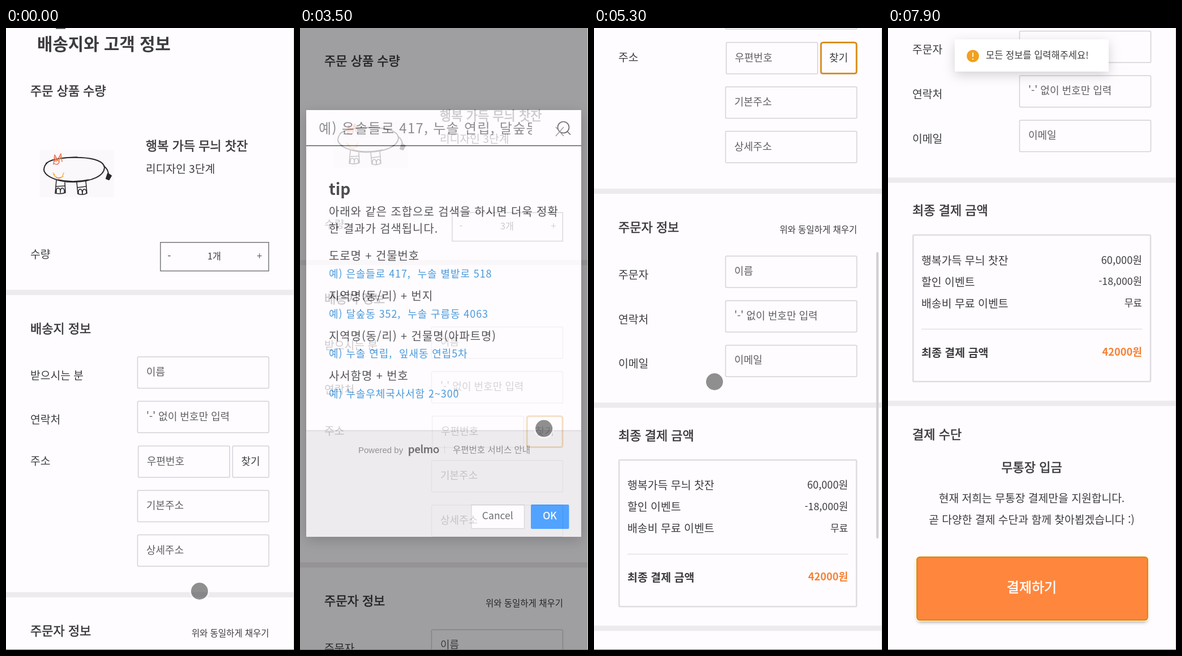
Recreate the animation shown at these times as an HTML page. Size 509 by 1099 pixels, loop 8000 ms.

```html
<!DOCTYPE html>
<html lang="ko">
<head>
<meta charset="utf-8">
<style>
html, body { margin: 0; width: 100%; height: 100%; overflow: hidden; background: #fefcff; }
svg { display: block; width: 100%; height: 100%; }
text { font-family: "Noto Sans CJK KR", "Noto Sans CJK", "Noto Sans", sans-serif; white-space: pre; fill: #3d3c3f; }
.m { stroke: #38373a; stroke-width: .55; fill: #38373a; }
.b { font-weight: 700; }
.ph { fill: #5f5e61; }
.k { fill: #1c1b1d; letter-spacing: .9px; }
.ex { fill: #0d79cf; letter-spacing: .9px; }
</style>
</head>
<body>
<svg id="stage" viewBox="0 0 509 1099" preserveAspectRatio="none"></svg>
<script>
const stage = document.getElementById('stage');
const ORANGE = '#d98a12';

// cy is the optical middle of the line
const text = (x, cy, size, str, cls = '', attr = '') =>
  `<text x="${x}" y="${cy + size * .37}" font-size="${size}" class="${cls}" ${attr}>${str}</text>`;
const mid = 'text-anchor="middle"', end = 'text-anchor="end"';
const rect = (x, y, w, h, attr) => `<rect x="${x}" y="${y}" width="${w}" height="${h}" ${attr}/>`;
const box = (x, y, w, h = 55.5) => rect(x, y, w, h, 'rx="2" fill="none" stroke="#d3d1d7" stroke-width="1.5"');
const bar = y => rect(0, y, 508, 9.3, 'fill="#edebee"');
const ring = (id, x, y, w, h) => rect(x, y, w, h, `id="${id}" rx="4" fill="#fefcff" stroke="${ORANGE}" stroke-width="2.8"`);
const label = (y, str) => text(43, y, 19.3, str);
const head = (y, str) => text(43, y, 22, str, 'm');
const field = (y, str) => box(232.5, y, 232) + text(248, y + 26.3, 18, str, 'ph');
const row = (y, name, price, size) => text(59, y, 19.4, name) + text(449, y - .7, size, price, '', end);

const animal = `
  ${rect(59, 216, 132, 83, 'fill="#faf8fb"')}
  <g fill="none" stroke="#29282a" stroke-width="2" stroke-linecap="round" stroke-linejoin="round">
    <path d="M71 239C82 230 110 228 133 229C156 230 174 236 174 247C173 261 153 271 121 272C94 273 69 263 67 251Q67 243 73 238"/>
    <path d="M80 234Q100 228 126 228M92 268Q118 274 146 268" stroke-width="1.4"/>
    <path d="M173 244Q181 250 181 259"/>
    <path d="M180 257l6 4-4 7-5-2z" fill="#29282a"/>
    <path d="M89 269L87 292Q96 294 105 291L104 273M88 280l16-1M89 291q-1-9 4-8 4 1 3 8 0-9 4-8 4 1 3 8" stroke-width="1.6"/>
    <path d="M125 272L127 293Q135 296 143 292L141 270M126 282l15-2M128 293q-1-9 4-8 3 1 3 8 0-9 4-8 4 1 3 7" stroke-width="1.6"/>
    <path d="M84 241L86 224L91 233L97 222L99 236M85 236Q92 231 94 237Q91 244 85 239" stroke="#ee7058" stroke-width="1.5"/>
    <path d="M87 229l2 7M96 227l-2 8" stroke="#f5a24c" stroke-width="2"/>
    <path d="M83 256l3 3M84 259Q92 269 101 262M100 261l2-5" stroke="#f3b64e" stroke-width="1.6"/>
    <path d="M88 264q5 3 9 0" stroke="#ee7058" stroke-width="1"/>
  </g>`;

const page = `
  ${rect(88, 0, 17, 1.6, 'fill="#4a494c"')}
  ${text(55, 28, 29.8, '배송지와 고객 정보', 'b')}
  ${head(110.5, '주문 상품 수량')}
  ${animal}
  ${text(247, 208, 22, '행복 가득 무늬 찻잔', 'm')}
  ${text(247, 248.5, 19.3, '리디자인 3단계')}
  ${label(399.5, '수량')}
  <rect id="stepper" y="378.8" height="50.5" fill="none" stroke="#77767a" stroke-width="1.5"/>
  <text id="minus" y="408.5" font-size="17" ${mid}>-</text>
  <text id="count" y="408.5" font-size="16.3" ${mid}></text>
  ${ring('plusRing', 432, 378.3, 33.3, 51.5)}
  ${text(448, 402.5, 17, '+', 'ph', mid)}
  ${bar(462.5)}
  ${head(530.5, '배송지 정보')}
  ${label(614, '받으시는 분')}${field(581, '이름')}
  ${label(692, '연락처')}${field(659.6, "'-' 없이 번호만 입력")}
  ${label(765, '주소')}
  ${box(233.7, 738.4, 161.6)}${text(249, 765, 18, '우편번호', 'ph')}
  ${box(400.5, 738.4, 64)}${ring('findRing', 401.2, 738.6, 62.8, 54.8)}
  ${text(432.3, 765, 18, '찾기', '', mid)}
  ${field(817, '기본주소')}${field(895.6, '상세주소')}
  ${bar(996.7)}
  ${head(1065, '주문자 정보')}
  ${text(465, 1069, 15.5, '위와 동일하게 채우기', '', end)}
  ${label(1148.5, '주문자')}${field(1116, '이름')}
  ${label(1227.5, '연락처')}${field(1194.8, "'-' 없이 번호만 입력")}
  ${label(1306, '이메일')}${field(1273.4, '이메일')}
  ${bar(1374.7)}
  ${head(1432.5, '최종 결제 금액')}
  ${rect(44.3, 1476.3, 419.7, 259, 'rx="2" fill="none" stroke="#dfdde2" stroke-width="2.6"')}
  ${row(1521, '행복가득 무늬 찻잔', '60,000원', 18.2)}
  ${row(1559, '할인 이벤트', '-18,000원', 17.8)}
  ${row(1597, '배송비 무료 이벤트', '무료', 17)}
  ${rect(59, 1641.8, 390, 1.5, 'fill="#e3e1e5"')}
  ${text(59, 1684, 19.5, '최종 결제 금액', 'b')}
  ${text(449, 1682.5, 18.2, '42000원', 'b', end + ' style="fill:#f58134"')}
  ${bar(1769)}
  ${head(1828, '결제 수단')}
  ${text(254, 1886.5, 22, '무통장 입금', 'm', mid)}
  ${text(254, 1941, 19.3, '현재 저희는 무통장 결제만을 지원합니다.', '', mid)}
  ${text(254, 1979, 19.3, '곧 다양한 결제 수단과 함께 찾아뵙겠습니다 :)', '', mid)}
  ${rect(52, 2046, 406, 110, 'rx="5" fill="#ff863d" filter="url(#lift)"')}
  <g id="payRing" fill="none">
    ${rect(49.6, 2043.8, 410.8, 114.4, 'rx="6" stroke="#fff" stroke-width="1.5"')}
    ${rect(51.3, 2045.5, 407.4, 111, `rx="5" stroke="${ORANGE}" stroke-width="2.4"`)}
  </g>
  ${text(254, 2099, 24, '결제하기', '', mid + ' style="fill:#fff;stroke:#fff;stroke-width:.6"')}`;

const tips = [
  ['도로명 + 건물번호', '예) 은솔들로 417,  누솔 별밭로 518'],
  ['지역명(동/리) + 번지', '예) 달숲동 352,  누솔 구름동 4063'],
  ['지역명(동/리) + 건물명(아파트명)', '예) 누솔 연립,  잎새동 연립5차'],
  ['사서함명 + 번호', '예) 누솔우체국사서함 2~300']
].map(([a, b], i) => text(51, 403 + i * 70.6, 20, a, 'k') + text(51, 434.5 + i * 70.5, 18, b, 'ex')).join('');

const modal = `
  ${rect(0, 0, 508, 1098, 'fill="#000" opacity=".5"')}
  ${rect(11, 145, 486, 754, 'fill="#fefcff" filter="url(#deep)"')}
  <g clip-path="url(#query)">${text(33, 177, 24, '예) 은솔들로 417, 누솔 연립, 달숲동', '', 'style="fill:#68676a;letter-spacing:1.3px"')}</g>
  <g fill="none" stroke="#3c3b3e" stroke-width="1.7">
    <circle cx="465.5" cy="175.5" r="10"/><path d="M472.5 183l5.5 5.5"/>
    <path d="M452 175l14 16M466 175l-14 16" stroke="#777" stroke-width="1.4"/>
  </g>
  ${rect(11, 207, 486, 1.8, 'fill="#4c4b4f"')}
  ${text(51, 285, 28, 'tip', 'b', 'style="fill:#111"')}
  ${text(51, 324.5, 20, '아래와 같은 조합으로 검색을 하시면 더욱 정확', 'k')}
  ${text(51, 354.5, 20, '한 결과가 검색됩니다.', 'k')}
  ${tips}
  ${rect(11, 711, 486, 188, 'fill="#e8e6e9"')}${rect(11, 710.5, 486, 2, 'fill="#d5d3d7"')}
  ${text(103, 745.5, 15, 'Powered by', '', 'style="fill:#6d6c6f;font-family:Liberation Sans,sans-serif"')}
  ${text(191, 744, 18.5, 'pelmo', 'm')}
  ${rect(255, 738, 1, 14, 'fill="#cccace"')}
  ${text(270, 745, 15.5, '우편번호 서비스 안내', '', 'style="fill:#6d6c6f"')}
  ${rect(303, 842.5, 93.5, 42, 'rx="1" fill="#fefcff" stroke="#cdcbd0" stroke-width="1.3"')}
  ${text(349.3, 862, 17.5, 'Cancel', '', mid)}
  ${rect(408, 842, 67.5, 43, 'rx="2" fill="#1585ff"')}
  ${text(441.5, 862, 17.5, 'OK', '', mid + ' style="fill:#fff;stroke:#fff;stroke-width:.4"')}
  <g id="hint">
    <path d="M90 192L94 205Q92.500 237 92.500 236Q92.500 242 98.500 242H251Q257 242 257 236V205.500Q257 199.500 251 199.500H102Z" fill="#fefcff" stroke="#d6d4d9" stroke-width="1.300"/>
    ${text(103, 221.5, 16.4, '터치하여 검색해 주세', 'ph', 'style="fill:#222"')}
    ${text(175, 261.5, 15.5, '요!', '', mid)}
  </g>`;

const toast = `
  ${rect(118, 20, 272, 57, 'rx="2" fill="#fff" filter="url(#soft)"')}
  <circle cx="150" cy="49.500" r="10.800" fill="#f2a01e"/>
  <path d="M150 43.500v7.500M150 54v2" stroke="#fff3d6" stroke-width="2.200"/>
  ${text(173, 47.5, 16.5, '모든 정보를 입력해주세요!')}`;

const shadow = (id, dy, blur, alpha) => `<filter id="${id}" x="-20%" y="-60%" width="140%" height="220%">
  <feDropShadow dx="0" dy="${dy}" stdDeviation="${blur}" flood-color="#000" flood-opacity="${alpha}"/></filter>`;

stage.innerHTML = `
  <defs>${shadow('lift', 4, 3, .4)}${shadow('deep', 6, 12, .3)}${shadow('soft', 6, 10, .17)}
    <clipPath id="query">${rect(30, 150, 380, 55, '')}</clipPath></defs>
  ${rect(0, 0, 509, 1099, 'fill="#fefcff"')}
  <g id="page">${page}</g>
  <rect id="thumb" x="498.800" width="4.200" height="506" rx="2" fill="#d2d0d4"/>
  ${rect(508, 0, 1, 1099, 'fill="#d6d4d8"')}
  <g id="modal">${modal}</g>
  <g id="toast">${toast}</g>
  <g id="cursor"><circle r="15" fill="#212121" fill-opacity=".5"/>
    <circle r="16.500" fill="none" stroke="#fff" stroke-opacity=".5" stroke-width="3"/></g>
  ${rect(0, 1098, 509, 1, 'fill="#747376"')}`;

// keys: [time, value...] with smooth interpolation between stops
function at(keys, t) {
  const i = keys.findIndex(k => k[0] > t);
  if (i < 0) return keys[keys.length - 1].slice(1);
  if (!i) return keys[0].slice(1);
  const a = keys[i - 1], b = keys[i], p = (t - a[0]) / (b[0] - a[0]), e = p * p * (3 - 2 * p);
  return a.slice(1).map((v, j) => v + (b[j + 1] - v) * e);
}
const scrollKeys = [[2000, 0], [2600, 52.7], [4700, 52.7], [5300, 713], [5800, 1113], [6000, 1110.5]];
const cursorKeys = [[0, 342, 995], [900, 446, 408], [1800, 446, 408], [1900, 361, 608], [2100, 352, 640],
  [2600, 348, 588], [3200, 431, 705], [3600, 431, 708], [4000, 442, 858], [4500, 328, 967], [4700, 300, 930],
  [5300, 213, 625], [5500, 216, 700], [5800, 222, 897], [6300, 232, 582], [6900, 256, 985]];
const modalKeys = [[3300, 0], [3600, 1], [4500, 1], [4700, 0]];
const thumbKeys = [[1900, 0], [2100, 1], [2600, 1], [2900, 0], [4700, 0], [4900, 1], [6000, 1], [6300, 0]];
const toastKeys = [[7200, 0], [7500, 1]];

const el = id => document.getElementById(id);
const set = (id, attrs) => { for (const k in attrs) el(id).setAttribute(k, attrs[k]); };
const fade = (id, v) => set(id, { opacity: +v });

function draw(t) {
  const [scroll] = at(scrollKeys, t), [x, y] = at(cursorKeys, t);
  const count = t < 1200 ? 1 : t < 1500 ? 2 : 3, plus = t >= 1200 && t < 3300;
  const left = count > 1 ? 269 : 273;
  set('page', { transform: `translate(0 ${-scroll})` });
  set('stepper', { x: left, width: 464.3 - left });
  set('minus', { x: left + 15.5 });
  set('count', { x: count > 1 ? 366 : 368 });
  el('count').textContent = count + '개';
  fade('plusRing', plus);
  fade('findRing', t >= 3300 && t < 7200);
  fade('payRing', t >= 7300);
  set('thumb', { y: 396 + (scroll - 713) * .4575 });
  fade('thumb', at(thumbKeys, t)[0]);
  fade('modal', at(modalKeys, t)[0]);
  fade('hint', t >= 3800);
  fade('toast', at(toastKeys, t)[0]);
  set('cursor', { transform: `translate(${x} ${y})` });
  fade('cursor', t < 7600);
}

const start = performance.now();
function tick() {
  draw(Math.floor((performance.now() - start) % 8000 / 100) * 100);
  requestAnimationFrame(tick);
}
tick();
</script>
</body>
</html>
```
